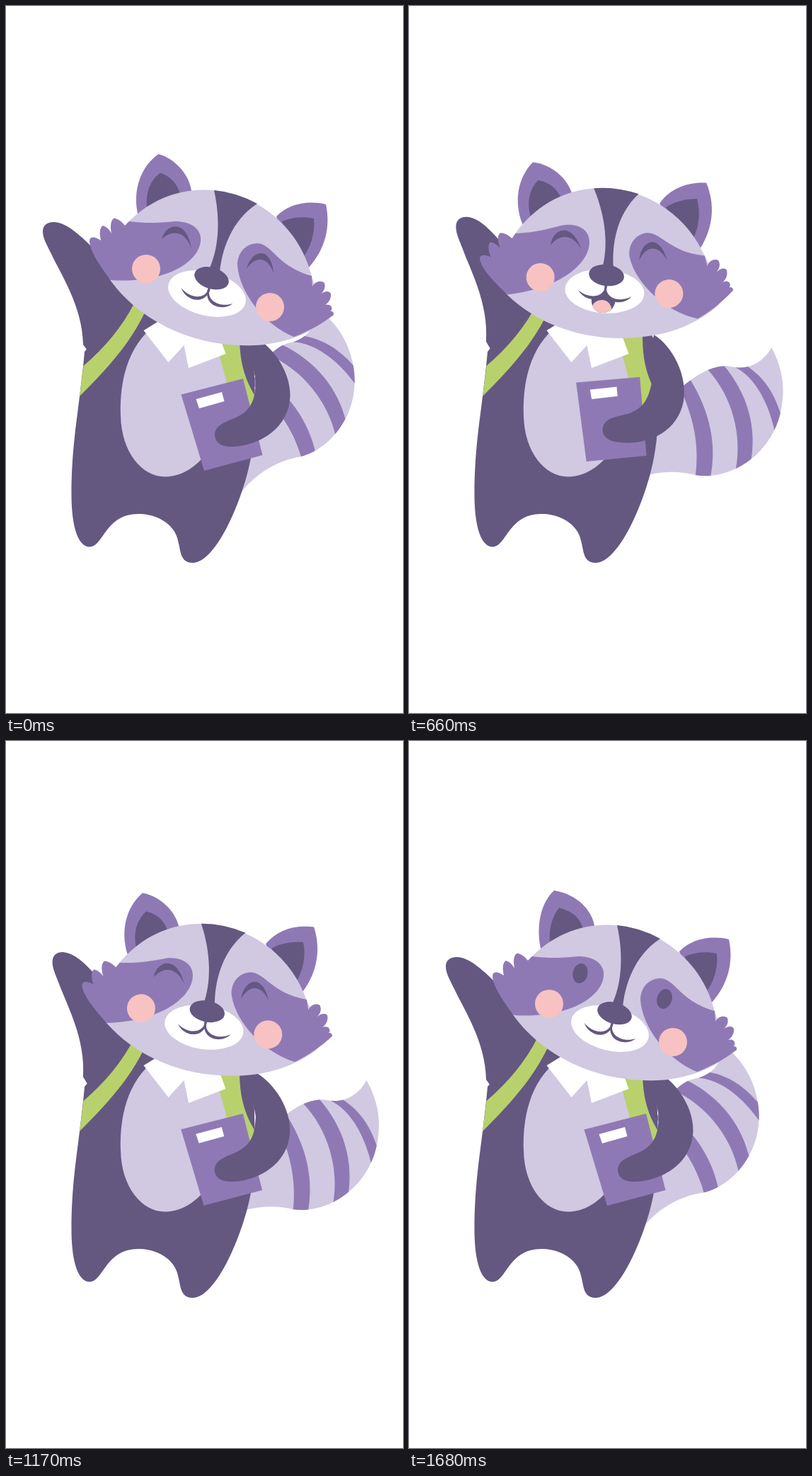
Recreate the animation shown at these times as an HTML page with a canvas. Size 561 px wide and 998 px high, loop 1710 ms.

```html
<!DOCTYPE html>
<html lang="en">
<head>
<meta charset="utf-8">
<title>Waving raccoon</title>
<style>
html, body { margin: 0; width: 100%; height: 100%; overflow: hidden; background: #fff; }
canvas { display: block; width: 561px; height: 998px; }
</style>
</head>
<body>
<canvas id="stage"></canvas>
<script>
const W = 561, H = 998, LOOP = 1710, STEP = 30;
const LIGHT = '#d0c9e1', PURPLE = '#8f79b5', DARK = '#645881', GREEN = '#b8d16d', PINK = '#f7c2c1', WHITE = '#fff';

const canvas = document.getElementById('stage');
const g = canvas.getContext('2d');
const ratio = window.devicePixelRatio || 1;
canvas.width = W * ratio;
canvas.height = H * ratio;

// Smooth monotone curve through [time, value] keys
function track(...keys) {
  const n = keys.length;
  const rate = i => (keys[i + 1][1] - keys[i][1]) / (keys[i + 1][0] - keys[i][0]);
  const slope = keys.map((k, i) => {
    if (i === 0 || i === n - 1) return 0;
    const a = rate(i - 1), b = rate(i);
    return a * b > 0 ? 2 * a * b / (a + b) : 0;
  });
  return t => {
    let i = 0;
    while (i < n - 2 && t >= keys[i + 1][0]) i++;
    const [t0, v0] = keys[i], [t1, v1] = keys[i + 1];
    const d = t1 - t0, u = (t - t0) / d, w = 1 - u;
    return v0 * (1 + 2 * u) * w * w + d * slope[i] * u * w * w
      + v1 * u * u * (3 - 2 * u) - d * slope[i + 1] * u * u * w;
  };
}

const headTurn = track([0, 0], [270, -4.48], [420, -7.56], [660, -9.9], [800, -10.1], [1020, -8.65], [1320, -1.95], [1500, 0], [LOOP, 0]);
const tailTurn = track([0, -13.2], [270, -6.7], [420, 0], [660, 10.9], [880, 14.7], [1020, 14.3], [1320, 2.5], [1620, -10.4], [1680, -12], [LOOP, -13.2]);
const waveTurn = track([0, 0], [240, -13.3], [270, -12.4], [420, -5.25], [600, 5.8], [660, 5.15], [850, -13.3], [1020, -5.25], [1080, 0], [1215, 5.8], [1320, 3.65], [1500, 0], [LOOP, 0]);
const bookTurn = track([0, 0], [270, 3], [420, 6.2], [660, 9.4], [750, 9.6], [1020, 3.3], [1200, 0], [LOOP, 0]);
const mouthOpen = track([0, 0], [270, .72], [420, .97], [500, 1], [800, 1], [1020, .5], [1170, 0], [LOOP, 0]);
const earBend = track([0, 0], [1560, 0], [1680, 1], [LOOP, 0]);

function shape(color, d) {
  g.fillStyle = color;
  g.fill(new Path2D(d));
}

function oval(color, x, y, rx, ry = rx, deg = 0) {
  g.fillStyle = color;
  g.beginPath();
  g.ellipse(x, y, rx, ry, deg * Math.PI / 180, 0, Math.PI * 2);
  g.fill();
}

function turned(deg, x, y, draw) {
  g.save();
  g.translate(x, y);
  g.rotate(deg * Math.PI / 180);
  g.translate(-x, -y);
  draw();
  g.restore();
}

function tail() {
  const outline = 'M483 454 C504 479 513 507 513 535 C514 602 461 650 411 651 C385 649 350 655 316 682 L325 590 L360 545 C380 517 405 491 433 491 C457 492 476 476 483 454Z';
  shape(LIGHT, outline);
  g.save();
  g.clip(new Path2D(outline));
  shape(PURPLE, 'M362 528 C394 570 410 610 412 655 L433 653 C434 608 418 560 374 515Z');
  shape(PURPLE, 'M400 501 C442 532 466 584 466 632 L485 620 C485 570 463 524 420 490Z');
  shape(PURPLE, 'M438 491 C470 500 496 535 511 572 L516 548 C500 517 482 498 454 486Z');
  g.restore();
}

function wavingArm() {
  shape(DARK, 'M109 478 C108 424 78 380 64 350 C56 334 52 327 52 318 C52 310 58 305 67 305 C85 305 105 323 131 350 C145 364 170 395 185 430 L190 500 L125 500Z');
}

function body() {
  shape(DARK, 'M109 509 L111 488 L150 440 L210 400 L330 435 L350 480 L352 570 C352 600 349 630 341 660 C325 720 292 786 264 786 C240 786 250 757 236 739 C226 725 207 717 187 717 C140 717 138 763.5 118 763.5 C99 763 92.5 726 92.5 690 C92.5 630 100 585 104 551Z');
  shape(GREEN, 'M109.5 508 C140 482 165 452 182 418 L200 424 C180 470 150 505 104 551Z');
  shape(LIGHT, 'M205 455 C165 490 161 545 162 578 C163 630 192 664.5 225 664.5 C280 664 318 590 312 530 L300 465Z');
  shape(GREEN, 'M302 465 L302 495 L313 535 L325 570 L345 570 L353 552 C336 525 330 500 330 465Z');
  shape(WHITE, 'M194.5 458 L229.5 503 L251.5 479 L258 511 L310.5 491 L301 465 L270 450 L214 446Z');
}

function bookArm() {
  shape(PURPLE, 'M247.5 548.5 L335 526 L362.5 634 L280 656Z');
  shape(WHITE, 'M268.5 555 L305 545 L308.5 558 L273 568Z');
  shape(DARK, 'M345 464 C374 476 402 514 401.5 550 C400 600 352 622 318 622 C300 622 295 613 295 605 C296 588 318 586 332 577 C349 566 352 552 353 530 L344 480Z');
}

function ears(k) {
  const x = 215.5 - 10.5 * k, y = 209 + 2 * k, ix = 218 - 6 * k;
  shape(PURPLE, `M186 293 C179 260 ${190 - 3 * k} 227 ${x} ${y} C${240 - 3 * k} 216 260 239 262.5 264 L230 310Z`);
  shape(DARK, `M199 284 C197 264 203 247 ${ix} 235.5 C234 241 243 252 246 267 L225 300Z`);
  shape(PURPLE, 'M382 297 C400 279 426 274 452 280 C459 312 451 343 428 369 L390 330Z');
  shape(DARK, 'M390 304 C404 298 420 297 435 300 C437 320 431 340 420 354 L395 330Z');
}

function eyes(open) {
  if (open) {
    oval(DARK, 242, 328, 10.5, 14.2, 11);
    oval(DARK, 361, 364, 10.5, 14.2, 17);
  } else {
    shape(DARK, 'M220 329 C226 306 256 300 262 343 C256 322 238 312 220 329Z');
    shape(DARK, 'M340 371 C346 345 374 336 378.5 378 C371 355 354 351 340 371Z');
  }
}

function mouth(open) {
  g.save();
  g.translate(285.5, 404);
  g.rotate(17 * Math.PI / 180);
  if (open > .02) {
    const b = 12 + 21 * open, c = 12 + 15 * open;
    const cavity = `M-18 13 C-8 15 -2 10 0 0 C2 10 8 15 16 13 C16 ${c} 7 ${b} -2 ${b} C-10 ${b} -18 ${c} -18 13Z`;
    shape(DARK, cavity);
    g.save();
    g.clip(new Path2D(cavity));
    oval(PINK, -2, b - 5, 14, 13);
    g.restore();
  }
  const half = 'M-38 5 C-30 18 -4 22 1.5 0 L1.5 -8 L-1.5 -8 L-1.5 0 C-6 14 -26 14 -38 5Z';
  shape(DARK, half);
  g.scale(-1, 1);
  shape(DARK, half);
  g.scale(-1, 1);
  oval(DARK, -1, -20.4, 25, 15);
  g.restore();
}

function head(t) {
  ears(earBend(t));
  shape(LIGHT, 'M167 311 C200 275 240 259.5 280 259.5 C350 260 415 310 432 382 L448 430 L440 452 C420 466 385 478 350 479 C265 482 190 445 148 388 L125 345 L140 330Z');
  shape(DARK, 'M294 260 Q326 263 355 279 C318 303 305 345 302 376 L286 374 C300 345 304 305 294 260Z');
  // Left and right eye patches with fur tufts
  shape(PURPLE, 'M174 304 C205 308 225 305 240 304 C265 304 277 318 275 332 C272 362 225 392 148 387 C132 366 118 345 118 331 C119 324 127 326 134 331 C132 321 132 313 137 310 C143 312 147 317 149 321 C147 310 148 302 153 299.5 C160 301 165 306 168 310Z');
  shape(PURPLE, 'M327 366 C327 346 341 335 355 335 C377 336 382 367 432 381 L433 396 C437 388 446 387 450 391 C452 398 449 403 444 407 C450 402 457 402 459 406 C460 414 455 420 449 423 C454 420 459 422 460 425 C461 428 460 430 458 431 C461 430 464 433 463 436 C446 449 428 459 407 467 C365 450 330 405 327 366Z');
  eyes(t >= 1500);
  oval(WHITE, 284, 406, 56, 31, 14);
  oval(PINK, 198, 371, 20);
  oval(PINK, 373, 425, 20);
  mouth(mouthOpen(t));
}

function render(now) {
  const t = Math.floor((now % LOOP) / STEP) * STEP;
  g.setTransform(ratio, 0, 0, ratio, 0, 0);
  g.fillStyle = WHITE;
  g.fillRect(0, 0, W, H);
  turned(tailTurn(t), 349.5, 621, tail);
  turned(waveTurn(t), 155, 475, wavingArm);
  body();
  turned(bookTurn(t), 345, 471, bookArm);
  turned(headTurn(t), 261, 448, () => head(t));
}

let start = null;
function tick(now) {
  if (start === null) start = now;
  render(Math.max(0, now - start));
  requestAnimationFrame(tick);
}
render(0);
requestAnimationFrame(tick);
</script>
</body>
</html>
```
